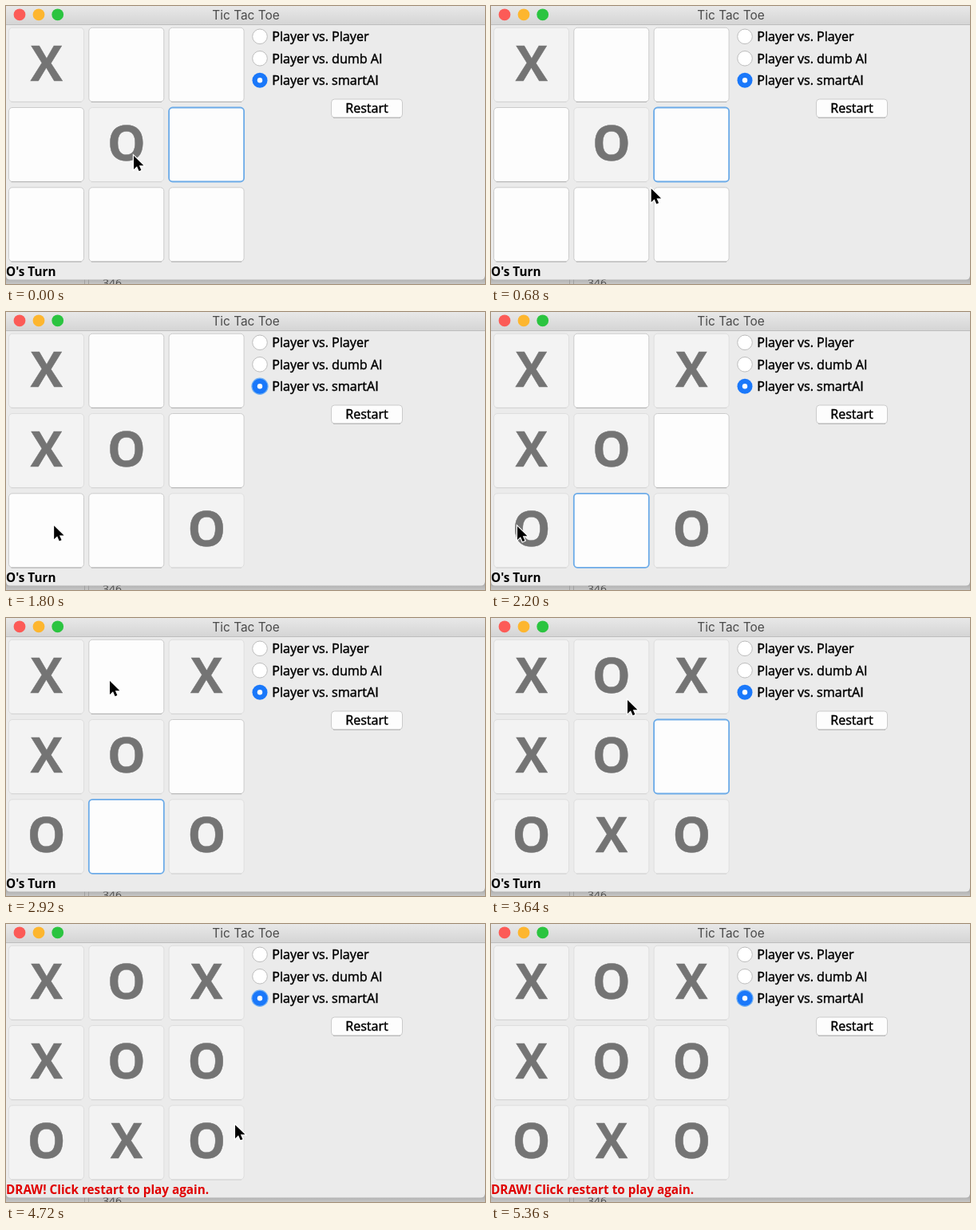
An HTML page for the animation above (5.4 s loop, 600 by 349 pixels).

```html
<!DOCTYPE html>
<html lang="en">
<head>
<meta charset="utf-8">
<title>Tic Tac Toe</title>
<style>
  html, body { margin: 0; width: 100%; height: 100%; overflow: hidden; background: #ebebeb; }
  svg { display: block; font: 500 16.1px "Open Sans", "Noto Sans", sans-serif; }
  .label { stroke: #000; stroke-width: .45; }
  .button { fill: #fdfdfd; stroke: #cbcbcb; }
  .edge { fill: none; stroke: #b4b4b4; }
  .taken { fill: #f3f3f3; stroke: #dedede; }
  .taken + .edge { stroke: #d4d4d4; }
  .pressed { fill: #ebebeb; }
  .focus { stroke: #6cabe8; stroke-width: 1.8; }
  .focus + .edge { stroke: none; }
  .mark { font-size: 60px; font-weight: 700; fill: #747474; stroke: #747474; stroke-width: .5; text-anchor: middle; }
  #status { font-size: 15.3px; font-weight: 700; }
</style>
</head>
<body>
<svg width="600" height="349" viewBox="0 0 600 349">
  <defs>
    <linearGradient id="bar" x2="0" y2="1">
      <stop stop-color="#e8e8e8"/><stop offset="1" stop-color="#d4d4d4"/>
    </linearGradient>
    <linearGradient id="shade" x2="0" y2="1">
      <stop stop-color="#a0a0a0"/><stop offset="1" stop-color="#c6c6c6"/>
    </linearGradient>
  </defs>
  <rect y="338" width="600" height="11" fill="url(#shade)"/>
  <path d="M98.5 343v6M103.5 343v6" stroke="#a0a0a0"/>
  <text x="121" y="353" font-size="14" fill="#4c4c4c">346</text>
  <path d="M0 0H600V338q0 5.5-5.5 5.5H5.5Q0 343.5 0 338z" fill="#ebebeb"/>
  <rect width="600" height="24" fill="url(#bar)"/>
  <path d="M0 23.5H600" stroke="#bdbdbd"/>
  <circle cx="17" cy="10.8" r="7.4" fill="#fc5b57"/>
  <circle cx="41" cy="10.8" r="7.4" fill="#fdb62f"/>
  <circle cx="64.7" cy="10.8" r="7.4" fill="#2bc440"/>
  <text x="300.5" y="17" text-anchor="middle" fill="#4a4a4a" style="font:400 15.4px Inter,sans-serif">Tic Tac Toe</text>

  <g id="board"></g>
  <g id="options"></g>
  <rect class="button" x="407.5" y="117" width="89" height="23" rx="4"/>
  <path class="edge" d="M410 140.3H494"/>
  <text class="label" x="452" y="134" text-anchor="middle">Restart</text>
  <text id="status" x="0" y="339"></text>

  <path id="cursor" d="M0 0V17l4-3.8 2.6 6 2.8-1.2-2.6-5.8h5.6z" stroke="#fff" stroke-width="2.4" paint-order="stroke"/>
</svg>
<script>
const LOOP = 5400, STEP = 40, PRESS = 120, RADIO = 9;
const $ = id => document.getElementById(id);

// The player's O and the instant reply X, with the control focused afterwards.
const moves = [
  { at: 0, o: 4, x: 0, focus: 5 },
  { at: 1120, o: 8, x: 3, focus: RADIO },
  { at: 2080, o: 6, x: 2, focus: 7 },
  { at: 3240, o: 1, x: 7, focus: 5 },
  { at: 4240, o: 5, focus: RADIO }
];

// Pointer stops: time, x, y
const stops = [
  [0, 160, 188], [360, 160, 188], [960, 234, 263], [1400, 234, 263],
  [1920, 33, 269], [2320, 33, 269], [2880, 130, 79], [3400, 130, 79],
  [3640, 171, 103], [3960, 253, 165], [4480, 253, 165], [5000, 330, 362], [LOOP, 330, 362]
];

const cells = [];
for (let i = 0; i < 9; i++) {
  const x = 3.5 + i % 3 * 100.3, y = 27.2 + Math.floor(i / 3) * 100.3;
  $('board').insertAdjacentHTML('beforeend', `<g>
    <rect class="button" x="${x}" y="${y}" width="94" height="93" rx="4.5"/>
    <path class="edge" d="M${x + 3} ${y + 93.3}h88"/>
    <text class="mark" x="${x + 47.2}" y="${y + 66.4}"></text></g>`);
  const g = $('board').lastElementChild;
  cells.push({ box: g.querySelector('rect'), mark: g.querySelector('text') });
}

['Player vs. Player', 'Player vs. dumb AI', 'Player vs. smartAI'].forEach((label, i) => {
  const y = 38.3 + i * 27.5;
  const dot = i < 2
    ? `<circle cx="318" cy="${y}" r="9.3" fill="#fff" stroke="#bdbdbd"/>`
    : `<circle id="halo" cx="318" cy="${y}" r="10.7" fill="#75b2f2"/>
       <circle cx="318" cy="${y}" r="9.5" fill="#1a78fa"/>
       <circle cx="318" cy="${y}" r="3.2" fill="#fff"/>`;
  $('options').insertAdjacentHTML('beforeend',
    `${dot}<text class="label" x="333.3" y="${y + 6}">${label}</text>`);
});

function pointer(t) {
  const i = stops.findIndex(s => s[0] > t);
  const [t0, x0, y0] = stops[i - 1], [t1, x1, y1] = stops[i];
  const p = (t - t0) / (t1 - t0), e = p * p * (3 - 2 * p);
  return [x0 + (x1 - x0) * e, y0 + (y1 - y0) * e];
}

function draw(t) {
  const marks = [];
  let focus, pressed;
  for (const m of moves) {
    if (t >= m.at) {
      marks[m.o] = 'O';
      if (m.x !== undefined) marks[m.x] = 'X';
      focus = m.focus;
    } else if (t >= m.at - PRESS) {
      focus = pressed = m.o;
    }
  }
  cells.forEach(({ box, mark }, i) => {
    mark.textContent = marks[i] || '';
    box.setAttribute('class', 'button' + (marks[i] ? ' taken' : '') +
      (i === pressed ? ' pressed' : '') + (i === focus ? ' focus' : ''));
  });
  $('halo').style.display = focus === RADIO ? '' : 'none';
  const over = t >= moves[4].at;
  $('status').textContent = over ? 'DRAW! Click restart to play again.' : "O's Turn";
  $('status').style.fill = over ? '#e00000' : '#000';
  $('cursor').setAttribute('transform', `translate(${pointer(t)})`);
}

let start;
function frame(now) {
  start ??= now;
  draw(Math.floor((now - start) % LOOP / STEP) * STEP);
  requestAnimationFrame(frame);
}
draw(0);
requestAnimationFrame(frame);
</script>
</body>
</html>
```
